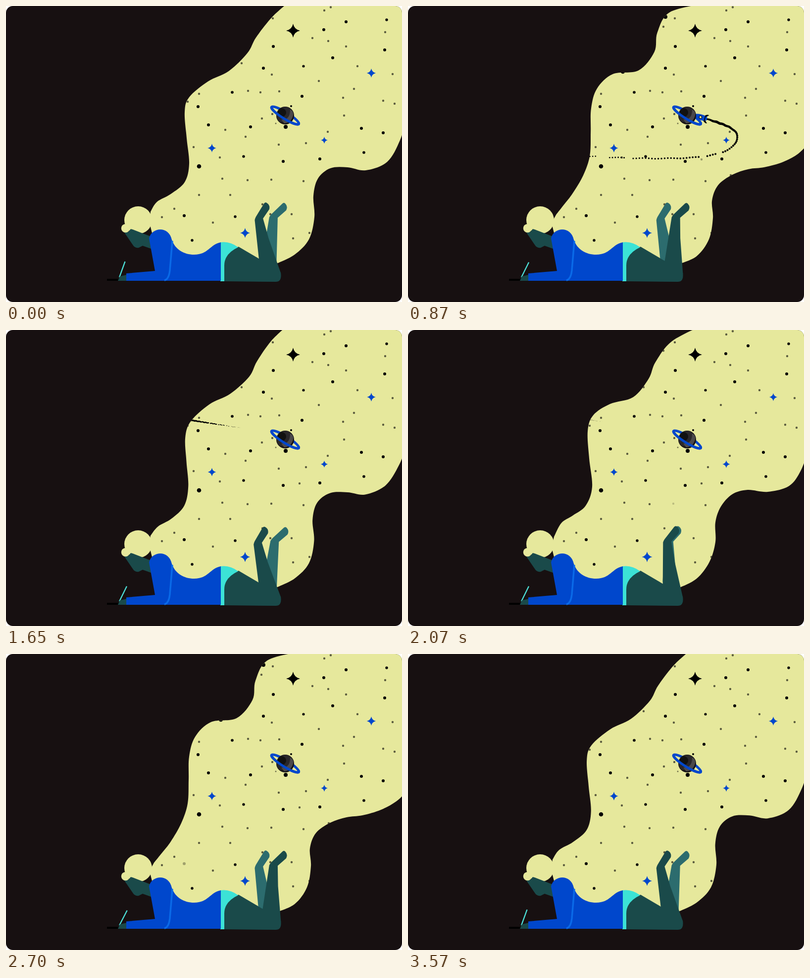
Recreate the animation shown at these times as an HTML page. Size 800 px wide and 600 px high, loop 3.6 s.

```html
<!DOCTYPE html>
<html lang="en">
<head>
<meta charset="utf-8">
<title>Daydream</title>
<style>
  html, body { margin: 0; width: 100%; height: 100%; overflow: hidden; background: #fff; }
  svg { display: block; width: 800px; height: 600px; }
</style>
</head>
<body>
<svg viewBox="0 0 800 600">
  <defs>
    <clipPath id="hairClip"><path id="hairEdge"/></clipPath>
    <path id="route" d="M330 302C400 307 480 311 560 308C630 305 668 290 665 262C662 248 640 240 600 228C560 216 500 202 445 194L330 176"/>
    <clipPath id="card"><rect width="800" height="600" rx="14"/></clipPath>
    <clipPath id="globe"><circle cx="564" cy="222" r="17"/></clipPath>
  </defs>
  <g clip-path="url(#card)">
    <rect width="800" height="600" fill="#171011"/>
    <path id="hair" fill="#e6e89c"/>
    <g clip-path="url(#hairClip)">
      <g id="dots"></g>
      <g id="stars"></g>
      <path id="trail"/>
      <g id="rocket">
        <path d="M-13-7Q-22-16-27-12Q-19-8-20 0Q-19 8-27 12Q-22 16-13 7Z"/>
        <path d="M-23-5L-15-8Q8-12 24 0Q8 12-15 8L-23 5Z" fill="#0047cc"/>
        <path d="M-18-8H-15.500V8H-18ZM14-5.800L18-3.600V3.600L14 5.800Z"/>
        <circle cx="-3" r="4" fill="#e6e89c" stroke="#000" stroke-width="1.500"/>
      </g>
      <g fill="none" stroke="#0047cc" stroke-width="5">
        <ellipse cx="564" cy="222" rx="32.500" ry="6.500" transform="rotate(32 564 222)"/>
        <circle cx="564" cy="222" r="18" fill="#151213" stroke="none"/>
        <g clip-path="url(#globe)" stroke="none">
          <circle cx="560" cy="218" r="18" fill="#29272a"/>
          <path d="M581 214Q580 236 562 238L556 230Q574 232 574 210Z" fill="#4b494b"/>
          <circle cx="557" cy="216" r="9" fill="#111"/>
        </g>
        <path d="M531.500 222A32.500 6.500 0 0 0 596.500 222" transform="rotate(32 564 222)"/>
      </g>
    </g>

    <circle cx="267" cy="434" r="28" fill="#e6e89c"/>
    <path fill="#1a4a4a" d="M239 459L247 458L252 452L256 453L292 467L296 493L276 486L268 490Q260 491 256 484Z"/>
    <circle cx="241.500" cy="450.500" r="8.700" fill="#e6e89c"/>

    <path id="farLeg" fill="#2c6c6e" d="M514 510L517 430Q518 427 520 424L540 399Q543 396 546 399Q552 404 549 412L534 429L543 517L543 535L518 530Z"/>
    <path id="nearLeg" fill="#1a4a4a" d="M515 522L517 430Q518 427 520 424L540 399Q543 396 546 399Q552 404 549 412L534 429L540 470L555 541L553 550L525 550Z"/>
    <path fill="#1a4a4a" d="M470 488L526 521L555 540Q558 559 545 559L440 558V520Q444 494 470 488Z"/>
    <path fill="#3ce2d6" d="M433 479Q452 476 469 489Q441 502 441 526V558H433Z"/>
    <path fill="#0047cc" d="M289 471C294 448 329 445 335 474C342 494 360 504 380 504C409 504 412 483 434 479V557H243V542L301 537Z"/>
    <path fill="none" stroke="#0a6ae8" stroke-width="3.500" d="M336 476L331 536Q329 554 320 556"/>
    <rect x="204" y="553" width="26" height="4"/>
    <path id="phone" stroke="#4de0d8" stroke-width="2.300"/>
    <path fill="#1a4a4a" d="M226 557L230 548L243 545V557Z"/>
  </g>
</svg>
<script>
const LOOP = 3600, WAVE = 1800, TAU = Math.PI * 2;
const $ = id => document.getElementById(id);
const pairs = (a, n = 2) => Array.from({ length: a.length / n }, (_, i) => a.slice(i * n, i * n + n));

// Outline of the hair at five moments of one wave, one row each
const hairTimes = [0, 270, 540, 900, 1245];
const left = [
  [574,-10, 538,22, 505,64, 488,95, 450,132, 408,153, 370,185, 361,215, 365,268, 370,320, 361,357, 333,381, 305,397, 292,417],
  [596,-10, 533,23, 500,65, 486,99, 455,136, 408,150, 374,173, 363,205, 366,260, 372,318, 359,356, 333,376, 310,391, 295,419],
  [625,-8, 532,19, 502,56, 493,95, 462,136, 412,143, 379,167, 367,207, 368,258, 371,308, 358,349, 328,378, 311,398, 298,422],
  [595,-5, 528,13, 504,54, 498,93, 466,130, 414,138, 382,168, 370,208, 369,255, 367,303, 354,343, 333,380, 316,402, 299,423],
  [566,-8, 526,23, 510,62, 500,95, 465,123, 419,142, 385,179, 367,222, 364,258, 364,305, 356,352, 337,385, 315,401, 293,419]
];
const right = [
  [812,220, 796,272, 770,316, 727,333, 690,327, 655,329, 630,350, 621,385, 623,428, 612,473, 583,504, 545,523],
  [812,235, 794,284, 770,316, 727,328, 686,324, 655,333, 632,358, 621,390, 621,430, 609,470, 583,504, 545,524],
  [812,255, 792,297, 764,317, 725,325, 686,326, 656,339, 632,364, 618,395, 618,430, 608,474, 583,509, 545,524],
  [812,276, 788,299, 757,316, 720,327, 688,331, 655,342, 626,363, 614,394, 616,430, 608,473, 583,507, 545,524],
  [812,260, 787,286, 757,312, 722,332, 688,334, 652,338, 624,356, 614,387, 619,430, 610,472, 583,503, 545,522]
];

const blackDots = [687,32,3, 642,48,3, 769,28,2.7, 765,89,3, 660,105,3, 601,122,2.6, 540,82,3, 520,126,3,
  457,175,2.8, 388,204,3, 598,183,3, 409,241,3, 494,245,3, 718,248,3, 762,257,3, 723,297,2.8, 634,310,3,
  560,315,3, 480,305,2.7, 390,325,4.3, 463,427,2.7, 376,475,2.7, 434,133,4.3, 520,22,4, 565,245,4, 576,203,2];
const greyDots = [643,9, 539,25, 516,42, 619,65, 651,71, 766,53, 687,82, 476,116, 537,139, 710,122, 781,138,
  632,152, 703,168, 681,186, 390,178, 367,194, 489,172, 514,175, 552,173, 762,192, 785,198, 683,222, 517,228,
  443,251, 484,265, 650,255, 379,286, 432,307, 551,281, 606,278, 437,350, 488,353, 601,355, 390,383, 453,383,
  340,411, 315,428, 418,439, 518,402, 534,422, 577,422, 580,471, 613,460, 652,343, 538,219, 656,2.5];

function add(parent, tag, attrs) {
  const el = document.createElementNS('http://www.w3.org/2000/svg', tag);
  for (const k in attrs) el.setAttribute(k, attrs[k]);
  return parent.appendChild(el);
}
const dot = (cx, cy, r, opacity = 1) => add($('dots'), 'circle', { cx, cy, r, opacity });
pairs(blackDots, 3).forEach(([x, y, r]) => dot(x, y, r));
pairs(greyDots).forEach(([x, y]) => dot(x, y, 2.2, 0.6));
dot(545, 238, 1.5, 0.5);

const dip = (t, at) => Math.min(1, 0.3 + Math.abs(t - at) / 170);
const blinkers = [
  [dot(360, 425, 3), t => dip(t, 2700)],
  [dot(536, 352, 2.2), t => 0.6 * dip(t, 2070)],
  [dot(593, 311, 2.2), t => 0.6 * Math.max(0, Math.min(1, (t - 700) / 300, (3500 - t) / 300))]
];

const stars = [[580, 50, 14, 0, '#000'], [738, 136, 8.3, 0.1], [416, 288, 8, 0.1], [643, 272, 7.5, -0.08], [483, 460, 10.5, -0.05]]
  .map(([x, y, r, beat, fill = '#0047cc']) => {
    const q = 0.17;
    const el = add($('stars'), 'path', { fill, d: `M0-1Q${q}-${q} 1 0Q${q} ${q} 0 1Q-${q} ${q}-1 0Q-${q}-${q} 0-1Z` });
    return t => el.setAttribute('transform', `translate(${x} ${y}) scale(${r * (1 + beat * Math.cos(t / 900 * TAU))})`);
  });

// Smooth value through keys; wraps when a period is given
function spline(times, get, t, period) {
  const n = times.length;
  let i = 0;
  while (i < n - 1 && t >= times[i + 1]) i++;
  const key = j => {
    if (!period) { j = Math.max(0, Math.min(n - 1, j)); return [times[j], get(j)]; }
    const k = (j + n) % n;
    return [times[k] + Math.floor(j / n) * period, get(k)];
  };
  const [[t0, a], [t1, b], [t2, c], [t3, d]] = [key(i - 1), key(i), key(i + 1), key(i + 2)];
  const h = t2 - t1;
  if (!h) return b;
  const u = (t - t1) / h, m1 = (c - a) / (t2 - t0) * h, m2 = (d - b) / (t3 - t1) * h;
  return b + u * (m1 + u * (3 * (c - b) - 2 * m1 - m2 + u * (m1 + m2 - 2 * (c - b))));
}

function smooth(pts) {
  let d = '';
  for (let i = 0; i < pts.length - 1; i++) {
    const p = pts[i], q = pts[i + 1], a = pts[i - 1] || p, b = pts[i + 2] || q;
    d += 'C' + [0, 1].map(k => (p[k] + (q[k] - a[k]) / 6).toFixed(2)) + ' '
       + [0, 1].map(k => (q[k] - (b[k] - p[k]) / 6).toFixed(2)) + ' ' + q.map(v => v.toFixed(2));
  }
  return d;
}

function drawHair(t) {
  const at = rows => pairs(rows[0].map((_, k) => spline(hairTimes, j => rows[j][k], t % WAVE, WAVE)));
  const l = at(left), r = at(right).reverse();
  const d = `M${l[0]}${smooth(l)}L290 440L300 480L400 520L${r[0]}${smooth(r)}L812-10Z`;
  $('hair').setAttribute('d', d);
  $('hairEdge').setAttribute('d', d);
}

const START = 460, LIFE = 600, route = $('route');
const flyTimes = [START, 540, 710, 850, 1030, 1230, 1510, 1800];
const flyDist = [0, 111, 355, 432, 524, 591, 647, 708];
const flown = t => spline(flyTimes, j => flyDist[j], Math.min(t, 1800));
const sizeAt = s => 1 - (s - 111) / 1000;
const noise = n => { const v = Math.sin(n * 12.9898) * 43758.5453; return v - Math.floor(v); };

function drawRocket(t) {
  const flying = t >= START && t < 1800;
  $('rocket').style.display = flying ? '' : 'none';
  if (flying) {
    const s = flown(t), p = route.getPointAtLength(s);
    const a = route.getPointAtLength(s - 3), b = route.getPointAtLength(s + 3);
    const deg = Math.atan2(b.y - a.y, b.x - a.x) * 360 / TAU;
    $('rocket').setAttribute('transform', `translate(${p.x} ${p.y}) rotate(${deg}) scale(${sizeAt(s)})`);
  }
  let d = '';
  for (let i = 0, e = START; e <= Math.min(t, 1700); e = START + 4 * ++i) {
    const age = (t - e) / LIFE;
    if (age >= 1 || noise(i >> 1) < age * 0.9 - 0.15) continue;
    const s = flown(e), k = sizeAt(s), p = route.getPointAtLength(Math.max(0, s - 22 * k));
    const r = 4.2 * k * Math.pow(1 - age, 1.3) * Math.min(1, 0.6 + age * 6);
    const y = p.y + Math.sin(i * 0.8) * 0.7 * k;
    d += `M${(p.x - r).toFixed(2)} ${y.toFixed(2)}a${r} ${r} 0 1 0 ${2 * r} 0a${r} ${r} 0 1 0 ${-2 * r} 0`;
  }
  $('trail').setAttribute('d', d);
}

const phoneTimes = [0, 300, 540, 1230, 2070, 2700, 3060, 3300];
const phoneTip = [240.5, 243, 244, 244, 244, 244.7, 244.7, 243];

function draw(t) {
  drawHair(t);
  drawRocket(t);
  const swing = 8.5 * Math.cos((t - 750) / WAVE * TAU);
  $('nearLeg').setAttribute('transform', `rotate(${swing} 540 545)`);
  $('farLeg').setAttribute('transform', `rotate(${-swing} 540 545)`);
  const x = spline(phoneTimes, j => phoneTip[j], t, LOOP);
  $('phone').setAttribute('d', `M229 550L${x} ${518 + (x - 240.5) * 0.4}`);
  blinkers.forEach(([el, f]) => el.setAttribute('opacity', f(t)));
  stars.forEach(f => f(t));
}

const begin = performance.now();
function tick() {
  draw((performance.now() - begin) % LOOP);
  requestAnimationFrame(tick);
}
tick();
</script>
</body>
</html>
```
